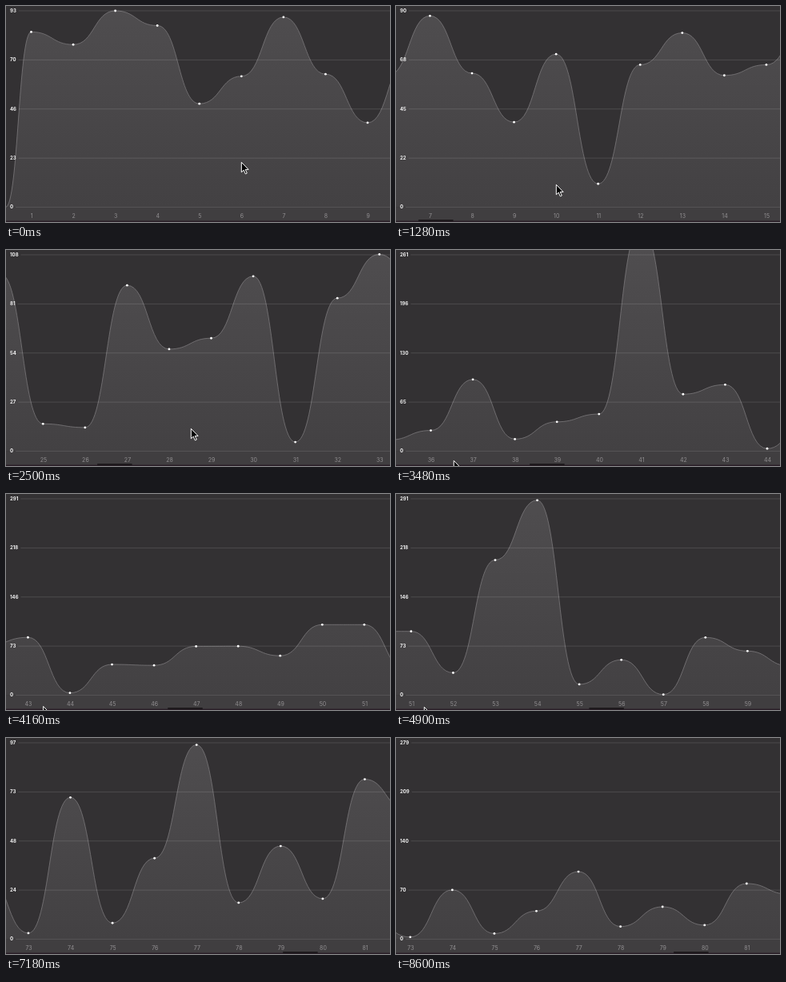
An HTML page with a canvas that plays this animation: 480 by 270 pixels, repeating every 8.62 s.

```html
<!DOCTYPE html>
<html lang="en">
<head>
<meta charset="utf-8">
<title>Scrolling graph</title>
<style>
  html, body { margin: 0; width: 100%; height: 100%; overflow: hidden; background: #333133; }
  canvas { display: block; width: 480px; height: 270px; }
</style>
</head>
<body>
<canvas id="stage"></canvas>
<script>
const W = 480, H = 270, LOOP = 8620;
const TOP = 6, BASE = 251.5, LEFT = 31.5, STEP = 52.56, COUNT = 100;
const FONT = 'Inter, "Open Sans", sans-serif';

const canvas = document.getElementById('stage');
const ctx = canvas.getContext('2d');
const dpr = window.devicePixelRatio || 1;
canvas.width = W * dpr;
canvas.height = H * dpr;

let seed = 7;
function random() {
  seed = (seed * 16807) % 2147483647;
  return seed / 2147483647;
}
const filler = n => Array.from({ length: n }, () => 20 + 60 * random());

// Chart series; stretches that only rush past are random.
const values = [
  83, 77, 93, 86, 49, 62, 90, 63, 40, 72, 11, 67, 82, 62, 67, 89, ...filler(6),
  103, 97, 15, 13, 91, 56, 62, 96, 5, 84, 108, 85, 13, 24, 83, 14, 34, 43, 261, 66, 77, 3, 41, ...filler(4),
  94, 94, 33, 199, 287, 16, 52, 1, 85, 65, 43, ...filler(4),
  94, 62, 89, 79, 6, 19, 28, 32, 3, 70, 8, 40, 96, 18, 46, 20, 79, 64, 279
];

// Key poses: time, scroll offset, pointer x, pointer y
const poses = [
  [180, 0, 294, 195], [1280, 304, 200, 223], [2500, 1246, 231, 223], [3480, 1827, 72, 263],
  [4900, 2640, 35, 266], [6140, 3462, 119, 258], [7220, 3789, 40, 285], [8600, 3798, 40, 285]
];

// Axis maximum from a given time on
const ranges = [[0, 93], [1174, 90], [1620, 108], [2950, 261], [4150, 291], [5150, 97], [7335, 279]];

// Monotone cubic through one column of the poses.
function pose(t, col) {
  const n = poses.length - 1;
  t = Math.min(Math.max(t, poses[0][0]), poses[n][0]);
  let i = 0;
  while (i < n - 1 && t > poses[i + 1][0]) i++;
  const slope = k => (poses[k + 1][col] - poses[k][col]) / (poses[k + 1][0] - poses[k][0]);
  const tangent = k => {
    if (k === 0 || k === n) return 0;
    const a = slope(k - 1), b = slope(k);
    return a * b > 0 ? 2 * a * b / (a + b) : 0;
  };
  const d = poses[i + 1][0] - poses[i][0], u = (t - poses[i][0]) / d, v = 1 - u;
  return poses[i][col] * v * v * (1 + 2 * u) + poses[i + 1][col] * u * u * (3 - 2 * u)
    + d * u * v * (v * tangent(i) - u * tangent(i + 1));
}

const rangeIndex = t => ranges.filter(([start]) => start <= t).length - 1;

// Each new maximum is reached in one second, easing out.
function rangeAt(t, i = rangeIndex(t)) {
  const [start, max] = ranges[i];
  if (i === 0) return max;
  const left = 1 - Math.min(1, (t - start) / 1000);
  return max + (rangeAt(start, i - 1) - max) * left * left;
}

function roundHalfEven(v) {
  const r = Math.round(v);
  return v % 1 === 0.5 && r % 2 ? r - 1 : r;
}

function curve(points) {
  const path = new Path2D();
  path.moveTo(points[0].x, points[0].y);
  for (let i = 1; i < points.length; i++) {
    const a = points[i - 1], b = points[i], mid = (a.x + b.x) / 2;
    path.bezierCurveTo(mid, a.y, mid, b.y, b.x, b.y);
  }
  return path;
}

function drawGraph(offset, max) {
  const points = values.map((v, i) => ({
    x: LEFT + i * STEP - offset,
    y: BASE - v * (BASE - TOP) / max,
    label: i + 1
  }));
  const line = curve([{ x: -0.5 - offset, y: BASE }, ...points]);
  const area = new Path2D(line);
  area.lineTo(points[points.length - 1].x, BASE);
  area.closePath();

  const shade = ctx.createLinearGradient(0, 0, 0, BASE);
  shade.addColorStop(0, '#4f4d4f');
  shade.addColorStop(1, '#434143');
  ctx.fillStyle = shade;
  ctx.fill(area);
  ctx.fillStyle = '#403e40';
  ctx.fillRect(0, BASE, W, H - BASE);
  ctx.strokeStyle = '#7b797b';
  ctx.lineWidth = 0.8;
  ctx.stroke(line);

  ctx.font = '7px ' + FONT;
  ctx.textAlign = 'center';
  for (const p of points) {
    if (p.x < -20 || p.x > W + 20) continue;
    ctx.fillStyle = '#fff';
    ctx.beginPath();
    ctx.arc(p.x, p.y, 1.4, 0, 7);
    ctx.fill();
    ctx.fillStyle = '#918f91';
    ctx.fillText(p.label, p.x + 0.6, 262.5);
  }
}

function drawScale(max) {
  ctx.font = '700 6px ' + FONT;
  ctx.textAlign = 'left';
  for (let i = 0; i <= 4; i++) {
    const y = BASE - (BASE - TOP) * i / 4;
    const text = String(roundHalfEven(max * i / 4));
    const x = 8 + ctx.measureText(text).width;
    ctx.fillStyle = 'rgba(255,255,255,.12)';
    ctx.fillRect(x, y - 0.5, W - x, 1);
    ctx.fillStyle = '#f4f4f4';
    ctx.fillText(text, 5, y + 0.2);
  }
}

function drawScrollbar(offset) {
  ctx.fillStyle = '#2a1f28';
  ctx.fillRect(0, 268.5, W, 1.5);
  if (offset <= 0) return;
  ctx.fillStyle = '#1d191c';
  ctx.beginPath();
  ctx.roundRect(offset * W / (COUNT * STEP), 267, 44, 2.2, 1.1);
  ctx.fill();
}

function drawPointer(x, y) {
  ctx.save();
  ctx.translate(x + 0.3, y + 0.3);
  ctx.beginPath();
  ctx.moveTo(0, 0);
  for (const [px, py] of [[0, 12.5], [2.9, 9.8], [5, 14.6], [7, 13.7], [4.9, 9.1], [8.8, 9.1]]) ctx.lineTo(px, py);
  ctx.closePath();
  ctx.fillStyle = '#000';
  ctx.fill();
  ctx.strokeStyle = '#fff';
  ctx.lineWidth = 1;
  ctx.stroke();
  ctx.restore();
}

function draw(t) {
  ctx.setTransform(dpr, 0, 0, dpr, 0, 0);
  ctx.fillStyle = '#333133';
  ctx.fillRect(0, 0, W, H);
  ctx.textBaseline = 'middle';
  const offset = pose(t, 1);
  drawGraph(offset, rangeAt(t));
  drawScale(ranges[rangeIndex(t)][1]);
  drawScrollbar(offset);
  drawPointer(pose(t, 2), pose(t, 3));
}

const start = performance.now();
function tick() {
  draw((performance.now() - start) % LOOP);
  requestAnimationFrame(tick);
}
tick();
</script>
</body>
</html>
```
